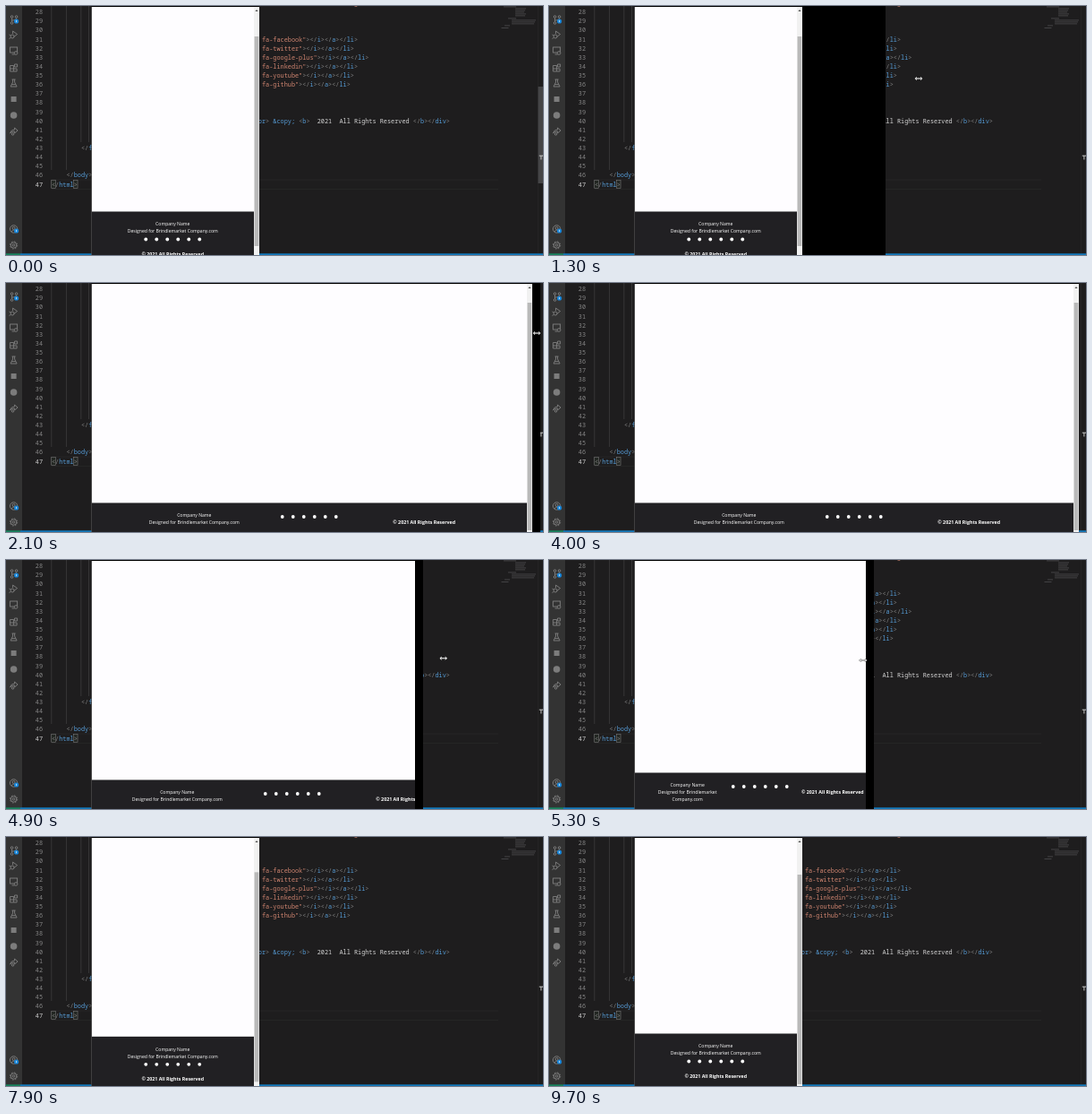
These frames come from a looping animation (600x278 px, 9800 ms). An HTML page:

```html
<!DOCTYPE html>
<html lang="en">
<head>
<meta charset="utf-8">
<title>Responsive footer</title>
<style>
  html, body { margin: 0; width: 100%; height: 100%; overflow: hidden; background: #1e1d1e; }
  svg { display: block; width: 600px; height: 278px; }
  text { white-space: pre; }
  .code { font: 6.87px "Noto Sans Mono", "DejaVu Sans Mono", monospace; }
  .page { font: 5.1px "Open Sans", "Noto Sans", sans-serif; fill: #fff; text-anchor: middle; }
  .bold { font-size: 5.3px; font-weight: 700; }
  .icon { fill: none; stroke: #808080; stroke-width: 0.9; }
</style>
</head>
<body>
<svg viewBox="0 0 600 278">
  <g id="editor"></g>
  <g id="slider"><rect x="594.5" y="90" width="5.5" height="108" fill="#454547"/></g>
  <g id="caret"><path d="M595.8 167.2H600M597.9 167.2V171.5" stroke="#c8c8c8"/></g>
  <g id="browser"></g>
  <g id="pointer">
    <path d="M-3.5 0H3.5M-2 -1.5L-3.7 0L-2 1.5M2 -1.5L3.7 0L2 1.5" fill="none" stroke="#444" stroke-width="1.5"/>
    <path d="M-3.5 0H3.5M-2 -1.5L-3.7 0L-2 1.5M2 -1.5L3.7 0L2 1.5" fill="none" stroke="#fff" stroke-width="0.9"/>
  </g>
</svg>
<script>
const LOOP = 9800, STEP = 100, LAG = 200;
const LEFT = 95.5, TOP = 1, BAR = 6, GAP = 9, SCALE = 0.338;
const CHAR = 4.122, CODE_X = 51, ROW = 10.125;
const $ = id => document.getElementById(id);

const rect = (x, y, w, h, fill, extra = '') =>
  `<rect x="${x}" y="${y}" width="${Math.max(0, w)}" height="${h}" fill="${fill}" ${extra}/>`;
const escapeText = s => s.replace(/&/g, '&amp;').replace(/</g, '&lt;');
const rowY = n => 37 + (n - 31) * ROW;

// ---------- editor ----------
const GREY = '#808080', BLUE = '#569cd6', RED = '#d08570', PLAIN = '#d4d4d4';

function colourOf(part) {
  if (/^(<\/?|>)$/.test(part)) return GREY;
  if (/^(&\w+;|i|a|li|b|br|div|body|html|footer)$/.test(part)) return BLUE;
  return part.includes('"') ? RED : PLAIN;
}

function code(line, col, s) {
  const parts = s.match(/<\/?|>|&\w+;|[^<>&]+/g);
  const spans = parts.map(p => `<tspan fill="${colourOf(p)}">${escapeText(p)}</tspan>`).join('');
  return `<text class="code" x="${CODE_X + col * CHAR}" y="${rowY(line) + 2.5}">${spans}</text>`;
}

function sideIcons() {
  const at = (y, shapes) => `<g class="icon" transform="translate(8.6 ${y})">${shapes}</g>`;
  const badge = `<circle cx="3" cy="2" r="2.6" fill="#1684d8" stroke="none"/><path d="M3 .8V3.2" stroke="#fff" stroke-width=".7"/>`;
  return at(15, `<circle cx="-2" cy="-3" r="1.3"/><circle cx="-2" cy="4" r="1.3"/><circle cx="3" cy="-3" r="1.3"/><path d="M-2 -1.7V2.7M3 -1.7Q3 1 -2 1"/>${badge}`)
    + at(32, `<path d="M-1 -4L4 -.5L0 2.5M-1 -4V-1"/><circle cx="-1.5" cy="2" r="2"/><path d="M-5 0L-3.5 1M-5 4.5L-3.5 3.5"/>`)
    + at(50, `<rect x="-4" y="-4" width="8" height="6"/><path d="M-2 4H1"/><circle cx="2.5" cy="2.5" r="1.8" fill="#333"/>`)
    + at(69, `<path d="M-4 -2.5H0V4H-4ZM-4 1H3.5V4H0M1 -4H4V-1H1Z"/>`)
    + at(86, `<path d="M-2 -4H2M-1 -4V-1L-3.5 4H3.5L1 -1V-4M-2.3 1.6H2.3"/>`)
    + at(104, `<rect x="-3" y="-3" width="6" height="6" fill="#7c7c7c" stroke="none"/>`)
    + at(122, `<circle r="3.8" fill="#7c7c7c" stroke="none"/>`)
    + at(140, `<path d="M-4 2Q-3 -2 1 -2V-4L4.5 -1L1 2V0Q-2 0 -4 2Z"/><circle cx="-1" cy="3" r="1.2"/>`)
    + at(249, `<circle r="4.2"/><circle cy="-1" r="1.5"/><path d="M-2.7 3Q0 -.5 2.7 3"/>${badge}`)
    + at(267, `<circle r="3.2"/><circle r="1.2"/><circle r="4.1" stroke-dasharray="1.6 1.62"/>`);
}

// Indented blocks of tiny lines: x, y, width, line count
function minimap() {
  const blocks = [[556, 0.5, 14, 1], [569, 2.5, 12, 5], [561, 13.5, 9, 1], [565, 15.5, 27, 3], [557, 21.5, 6, 1], [553.5, 24, 8, 1]];
  return blocks.map(([x, y, w, count]) =>
    Array.from({ length: count }, (_, i) => rect(x, y + i * 2, w - i % 3, 0.8, '#4c4c4e')).join('')).join('');
}

function drawEditor() {
  let out = rect(0, 0, 600, 278, '#1e1d1e');
  [[50.5, 183], [67, 183], [83.5, 152], [92, 152]].forEach(([x, h]) => out += rect(x, 0, 0.7, h, '#404040'));
  out += rect(CODE_X, 193.7, 499, 0.7, '#292929') + rect(CODE_X, 204.3, 499, 0.7, '#292929');
  for (let n = 28; n <= 47; n++) {
    out += `<text class="code" x="41" y="${rowY(n) + 2.5}" text-anchor="end" fill="${n === 47 ? '#d0d0d0' : '#858585'}">${n}</text>`;
  }
  out += code(27, 78, 'x-right">');
  ['facebook', 'twitter', 'google-plus', 'linkedin', 'youtube', 'github'].forEach((name, i) =>
    out += code(31 + i, 57, `fa-${name}"></i></a></li>`));
  out += code(40, 56, 'br> &copy; <b>  2021  All Rights Reserved </b></div>');
  out += code(43, 8, '</footer>') + code(46, 4, '</body>');
  [0, 6].forEach(col => out += rect(CODE_X + col * CHAR - 0.3, 194.5, 4.6, 9, '#232723', 'stroke="#777" stroke-width=".6"'));
  out += code(47, 0, '</html>') + minimap();
  out += rect(594.5, 0, 0.6, 276, '#2a2a2a');
  out += rect(0, 0, 18, 278, '#333') + sideIcons();
  out += rect(0, 276.3, 16, 2, '#16825d') + rect(16, 276.3, 584, 2, '#1177bb');
  $('editor').innerHTML = out;
}

// ---------- browser ----------
const EDGE = [[0, 283], [1100, 283], [1300, 376], [1500, 470], [1700, 550], [1900, 588], [2100, 597],
  [2400, 592], [4600, 592], [5100, 382], [5300, 363], [5600, 335], [6200, 304], [6500, 304], [7100, 283]];
const POINTER = [[1000, 287, 118], [1100, 284, 100], [1300, 413, 81], [1700, 570, 62], [2100, 593, 56],
  [2500, 592, 60], [4100, 594, 90], [4600, 592, 108], [5300, 351, 112], [5600, 330, 114],
  [6200, 304, 118], [6500, 304, 119], [7100, 283, 121]];
const SCROLL = [[7700, 0], [8000, 10]];

function track(keys, t, i = 1) {
  const n = keys.findIndex(k => k[0] > t);
  if (n < 0) return keys[keys.length - 1][i];
  if (n === 0) return keys[0][i];
  const a = keys[n - 1], b = keys[n];
  return a[i] + (b[i] - a[i]) * (t - a[0]) / (b[0] - a[0]);
}

const label = (x, y, s, bold) => `<text class="page${bold ? ' bold' : ''}" x="${x}" y="${y + 1.8}">${s}</text>`;
const lines = (x, y, list, bold) => list.map((s, i) => label(x, y + i * 8, s, bold)).join('');
function dots(x, y, count) {
  let out = '';
  for (let i = 0; i < count; i++) {
    out += `<circle cx="${x + (i - (count - 1) / 2) * 12}" cy="${y}" r="1.9" fill="#fff"/>`;
  }
  return out;
}

const BRAND = 'Brindlemarket', RIGHTS = '© 2021 All Rights Reserved';
const SIZES = [
  { min: 1200, box: 1140, top: 245.5, thumb: 22, about: [`Designed for ${BRAND} Company.com`] },
  { min: 992, box: 960, top: 237.5, thumb: 24, about: [`Designed for ${BRAND}`, 'Company.com'] },
  { min: 768, box: 720, top: 237.5, thumb: 28, about: [`Designed for ${BRAND}`, 'Company.com'] },
  { min: 576, box: 540, top: 229.5, thumb: 34, about: ['Designed for', BRAND, 'Company.com'], narrow: true },
  { min: 0, top: 229.5, thumb: 34, about: [`Designed for ${BRAND} Company.com`] }
];

function footer(size, mid, top) {
  const about = ['Company Name', ...size.about];
  if (!size.box) {
    return lines(mid, top + 14, about) + dots(mid, top + 31, 6) + label(mid, top + 47.5, RIGHTS, true);
  }
  const col = size.box * SCALE / 3;
  return lines(mid - col, top + 14, about)
    + (size.narrow ? dots(mid, top + 15, 4) + dots(mid, top + 24.5, 2) : dots(mid, top + 15.5, 6))
    + lines(mid + col, top + 22, size.narrow ? ['© 2021 All Rights', 'Reserved'] : [RIGHTS], true);
}

function drawBrowser(t) {
  const outer = track(EDGE, t), page = track(EDGE, t - LAG);
  const right = page > outer ? outer - GAP : page;
  const size = SIZES.find(s => (page - LEFT) / SCALE >= s.min);
  const scroll = size.box ? 0 : track(SCROLL, t);
  const top = size.top - scroll, bar = page - BAR;
  const thumb = size.thumb + scroll * 0.8;
  const thumbEnd = size.box ? 276 : 268 + scroll * 0.8;

  $('browser').innerHTML =
    `<clipPath id="view"><rect x="${LEFT}" y="0" width="${right - LEFT}" height="278"/></clipPath>`
    + rect(LEFT, 0, outer - LEFT, 278, '#000')
    + '<g clip-path="url(#view)">'
    + rect(LEFT, TOP, page - LEFT, 277, '#fefdff')
    + rect(LEFT, top, bar - LEFT, 278 - top, '#212023')
    + footer(size, (LEFT + bar) / 2, top)
    + rect(bar, TOP, BAR, 277, '#f1f1f1')
    + rect(bar + 0.6, thumb, BAR - 1.2, thumbEnd - thumb, '#b9b9b9')
    + `<path d="M${bar + 1.4} 6L${bar + 3} 4L${bar + 4.6} 6Z" fill="#505050"/></g>`;

  const shown = (t >= 1000 && t < 2600) || (t >= 4100 && t < 7300);
  $('pointer').setAttribute('visibility', shown ? 'visible' : 'hidden');
  $('pointer').setAttribute('transform', `translate(${track(POINTER, t)} ${track(POINTER, t, 2)})`);
  $('slider').setAttribute('visibility', t < 700 ? 'visible' : 'hidden');
}

let last = -1;
const start = performance.now();
function tick() {
  const t = Math.floor((performance.now() - start) % LOOP / STEP) * STEP;
  if (t !== last) drawBrowser(last = t);
  requestAnimationFrame(tick);
}
drawEditor();
tick();
</script>
</body>
</html>
```
